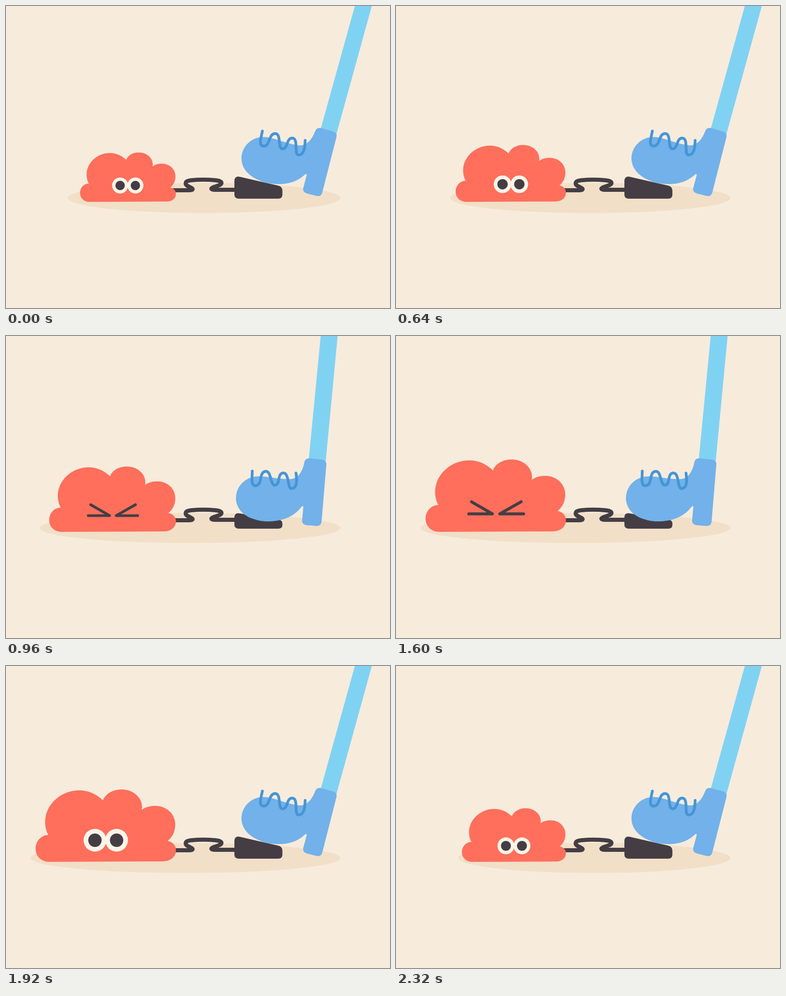
An HTML page that plays this animation: 844x663 px, repeating every 2400 ms.

```html
<!DOCTYPE html>
<html lang="en">
<head>
<meta charset="utf-8">
<title>Foot pump</title>
<style>
html, body { margin: 0; width: 100%; height: 100%; overflow: hidden; background: #f7ebdc; }
svg { display: block; width: 100%; height: 100%; }
.dark { fill: #443e44; }
.line { fill: none; stroke: #443e44; stroke-linecap: round; stroke-linejoin: round; }
</style>
</head>
<body>
<svg viewBox="0 0 844 663">
  <ellipse id="shadow" cy="421.5" ry="33" fill="#f1dfc8"/>
  <path class="line" stroke-width="9" d="M368 404.5H402C412 404.5 412 401.5 406 398.5C398 395 394.5 393 395 388.5C395.5 384 402 383.3 408 382.5C422 381 444 381 460 382.5C468 383.3 474 385 473.5 389C473 393 465 394.5 458 397C449 400 449 403.5 460 403.5H510"/>
  <g id="cloud">
    <path fill="#ff6f5c" d="M95 430C78 430 65 418 65 401C65 384 78 371 93 371C88 362 86 352 86 342C86 305 120 273 161 273C181 273 199 281 213 295C219 280 235 271 254 271C280 271 299 289 299 309C299 312 298.7 314 298 316C306 310 316 307 328 307C353 307 372 325 372 348C372 363 366 376 355 384C366 386 373.5 394 373.5 404C373.5 419 362 429 343 429Z"/>
    <path id="squint" class="line" stroke-width="6.5" d="M166 364L212 390.5H160M275 364L228 390.5H280.5"/>
  </g>
  <g id="eyes">
    <g fill="#fdf4e8"><circle cx="-23.8" r="25"/><circle cx="23.8" r="25"/></g>
    <g class="dark"><circle cx="-23.8" r="14.7"/><circle cx="23.8" r="14.7"/></g>
  </g>
  <path id="pedal" class="dark"/>
  <path id="leg" fill="#80d2f3"/>
  <g id="boot">
    <path fill="#72b1e9" d="M692 268L718 275Q728 278 726.5 287L695 410Q692 419 683 417L661 411.5Q651 408 653.5 399L661 371Q660.5 367 657 370C640 386 620 391 600 391C575 391 559 385 545 377C528 367 517.5 352 517.5 334C518 308 540 287.5 566 287.5C590 288 615 303 645 306C660 307 672 294 679 276Q682 266 692 268Z"/>
    <path fill="none" stroke="#4595d6" stroke-width="6" stroke-linecap="round" d="M563.5 274.5L560 291C557.5 304 561 307.5 566.5 307.5C581 307.5 577 280 591.5 280C606 280 596 313.5 608 313.5C620 313.5 616 290 629 290C644 290 632 327 643 327C655 327 657 312 657.5 295"/>
  </g>
</svg>
<script>
const LOOP = 2400, BEAT = 320, STEP = 80;
const RIGHT = 373.5, FLOOR = 430, SHADOW_RIGHT = 735;
const $ = id => document.getElementById(id);
const set = (id, name, value) => $(id).setAttribute(name, value);

// size of the cloud, left edge of the shadow, optional eyes [x, y, scale]
const sizes = [
  { s: .683, left: 136, eyes: [267.6, 394, .705] },
  { s: .786, left: 119, eyes: [252.6, 391.3, .775] },
  { s: .903, left: 75 },
  { s: 1, left: 54 }
];

const up = {
  pedal: "M502 384C502 377 507 373 514 375L599 394.5Q607.5 397 607.5 405V414Q607.5 423 598 423H512Q502 423 502 414Z",
  leg: "M767 -1H804.3L726 282L690 276Z",
  turn: 0
};
const down = {
  pedal: "M502 398Q502 389 511 389L600 403.5Q607.5 405 607.5 411V415Q607.5 423 598 423H512Q502 423 502 414Z",
  leg: "M691.8 -1H729L702 282L665 276Z",
  turn: -9.6
};

// Each press inflates one size, then the air leaves in even steps.
function poseAt(t) {
  const beat = Math.floor(t / BEAT);
  if (beat < 6) return { ...sizes[Math.ceil(beat / 2)], pressed: beat % 2 === 1 };
  const i = Math.floor((t - 6 * BEAT) / STEP);
  return { s: 1 - .0518 * i, left: 54 + 16.6 * i, pressed: false };
}

function draw(t) {
  const { s, left, eyes, pressed } = poseAt(t);
  const foot = pressed ? down : up;
  const [ex, ey, es] = eyes || [RIGHT - 154.2 * s, FLOOR - 47.5 * s, s];
  set("shadow", "cx", (left + SHADOW_RIGHT) / 2);
  set("shadow", "rx", (SHADOW_RIGHT - left) / 2);
  set("cloud", "transform", `translate(${RIGHT} ${FLOOR}) scale(${s}) translate(${-RIGHT} ${-FLOOR})`);
  set("squint", "visibility", pressed ? "visible" : "hidden");
  set("eyes", "visibility", pressed ? "hidden" : "visible");
  set("eyes", "transform", `translate(${ex} ${ey}) scale(${es})`);
  set("pedal", "d", foot.pedal);
  set("leg", "d", foot.leg);
  set("boot", "transform", `rotate(${foot.turn} 683 417.5)`);
}

const start = performance.now();
function tick() {
  draw((performance.now() - start) % LOOP);
  requestAnimationFrame(tick);
}
tick();
</script>
</body>
</html>
```
